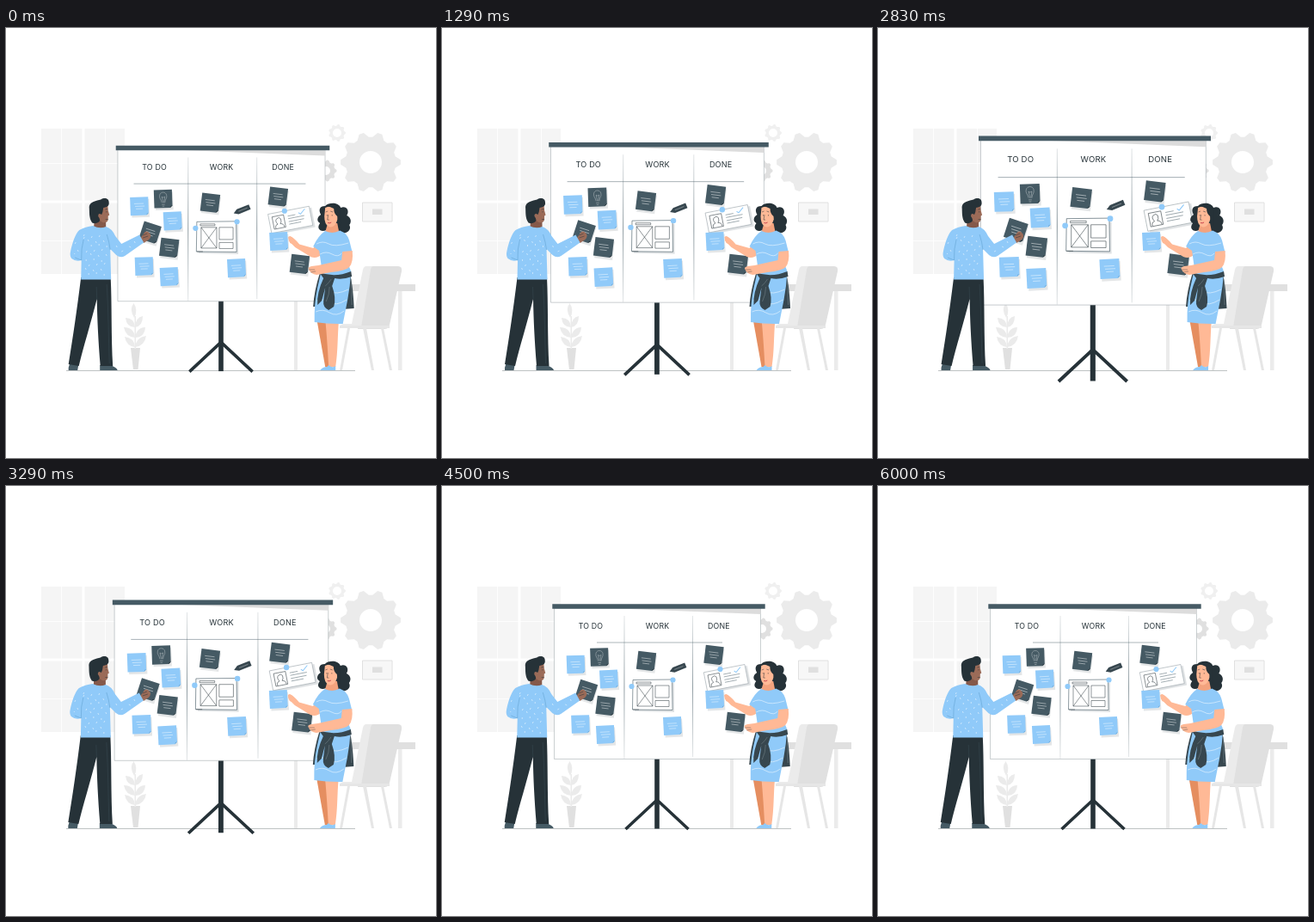
An HTML page that plays this animation: 500x500 px, repeating every 6040 ms.

```html
<!DOCTYPE html>
<html lang="en">
<head>
<meta charset="utf-8">
<title>Task board</title>
<style>
html, body { margin: 0; width: 100%; height: 100%; overflow: hidden; background: #fff; }
svg { display: block; width: 100%; height: 100%; }
text { font: 400 8.8px Inter, "Open Sans", sans-serif; letter-spacing: .15px; fill: #263238; }
.line { fill: none; stroke: #263238; stroke-width: .5; }
.white { fill: none; stroke: #fff; stroke-width: .5; }
.thin { fill: none; stroke: #455a64; stroke-width: .45; }
</style>
</head>
<body>
<svg viewBox="0 0 500 500">
  <linearGradient id="fade" gradientUnits="userSpaceOnUse" x1="0" y1="151" x2="0" y2="317">
    <stop stop-color="#455a64" stop-opacity=".25"/>
    <stop offset=".5" stop-color="#455a64"/>
    <stop offset="1" stop-color="#455a64" stop-opacity=".25"/>
  </linearGradient>
  <g id="room">
    <path fill="#f5f5f5" d="M41 117H138V286H41Z"/>
    <path stroke="#fff" stroke-width="3" d="M90 116V287M40 202H139"/>
    <path stroke="#fff" stroke-width=".8" d="M64.500 116V287M115.500 116V287M40 157.500H139M40 247.500H139"/>
    <path fill="#f7f7f7" stroke="#e0e0e0" d="M414.500 203H449V225H414.500Z"/>
    <path fill="#e0e0e0" d="M426 210.500H437.500V217H426ZM345 298H476V306H345Z"/>
    <path fill="#ebebeb" d="M335 306H339V398H335ZM456 306H460.500V398H456Z"/>
    <path fill="#e0e0e0" d="M419 277H456Q461 277 460 283L446 345Q445 350 440 350H409Z"/>
    <path fill="#ebebeb" d="M419 277H427Q425 277 424 281L413 348H388Q389 344 393 344H402L415 281Q416 277 419 277Z"/>
    <path fill="#e6e6e6" d="M388 346H446V349H388ZM397 349H400L391 398H388ZM415 349H419L428 398H425ZM436 349H439L449 398H446Z"/>
    <path fill="#e0e0e0" d="M145 372H156L153.500 397H148Z"/>
    <g fill="#ebebeb">
      <path d="M148.500 320Q143 327 149 337Q154 328 148.500 320ZM149.500 335H151V373H149.500Z"/>
      <path d="M150 348Q140 348 139 337Q149 337 150 348Q151 336 159 335Q159 347 150 348Z"/>
      <path d="M150 360Q139 359 137 348Q149 348 150 360Q152 348 162 348Q161 360 150 360Z"/>
      <path d="M150 371Q140 370 138 359Q149 360 150 371Q152 359 163 358Q161 370 150 371Z"/>
    </g>
  </g>

  <g id="board">
    <path stroke="#263238" stroke-width="3.600" fill="none" d="M250 365L213.500 399M250 365L286.500 399"/>
    <path fill="#263238" d="M247.200 316H252.800V398.500H247.200Z"/>
    <path fill="#fff" stroke="#a8b0b4" stroke-width=".6" d="M130.500 142H370.500V317.500H130.500Z"/>
    <path fill="#dcdcdc" d="M205 142.500H370.500V149Z"/>
    <path fill="#455a64" d="M128.300 137.300H375.700V142.700H128.300Z"/>
    <path fill="none" stroke="url(#fade)" stroke-width=".6" d="M212 151L211.900 317M291.500 151L291.600 315"/>
    <path class="thin" id="rule"/>
    <text x="158.700" y="165.500">TO DO</text>
    <text x="236.800" y="165.500">WORK</text>
    <text x="309" y="165.500">DONE</text>
    <g id="notes"></g>
    <path class="white" opacity=".6" d="M181.500 203.500C181 199.500 178 198.500 179 194.500C180 190.500 186 190.500 187 194.500C188 198.500 185 199.500 185 203.500M181.500 205.500H185M182 207.500H184.500M183 203.500L181.500 196.500L183 197.500L185 196.500L184 203.500"/>
    <g transform="rotate(-22 274 212)">
      <path fill="#37474f" d="M264 212L269 209H284V215H269Z"/>
      <path class="white" d="M270 212H281" opacity=".6"/>
    </g>
    <path fill="#dfe2e4" d="M224 228L270 229V263L224 262Z"/>
    <path fill="#fff" stroke="#455a64" stroke-width=".6" d="M222 225.500L267.500 225L268 260.500L221.500 260Z"/>
    <path class="line" d="M226 228H243V230H226ZM227 232H245V256H227ZL245 256M245 232L227 256M248 232H264V246H248ZM248 249.500V256.500H264V249.500ZM222 260H229"/>
    <g transform="rotate(-11 330 223)">
      <path fill="#dfe2e4" d="M308 214H357V237H308Z"/>
      <path fill="#fff" stroke="#8b979d" stroke-width=".5" d="M306 212H354.500V234.500H306Z"/>
      <path class="line" d="M310 216H323.500V230.500H310ZM312 230V228Q312 226 315 225.500Q312 221 315 219Q318 217 319.500 220Q320 224 318 225.500Q322 226 322 230"/>
      <path class="thin" d="M328 218.500H337M328 221.500H347M328 225H346M328 228H342"/>
      <path fill="none" stroke="#90caf9" d="M341 217L343 219L349 214"/>
    </g>
    <g fill="#90caf9">
      <circle cx="220.500" cy="233" r="3.100"/>
      <circle cx="268.500" cy="225.500" r="3.100"/>
      <circle cx="323.500" cy="213" r="3.100"/>
    </g>
  </g>

  <path class="line" d="M70 398.500H406" opacity=".6"/>

  <g id="man">
    <path fill="#455a64" d="M74 390L84 392L83 398H72.500Q72 395 74 390ZM109 392H121Q129 395 129.500 398H109Z"/>
    <path fill="#263238" d="M87 290H121.500C123 320 122 360 124 393H109.500C107 362 106 340 105.500 315C98 345 90 370 84.500 393L72.500 391C78 357 82 330 87 290Z"/>
    <path class="thin" d="M105.500 315L105 301M117 298C119 330 119 360 120 390" opacity=".7"/>
    <path fill="#85594a" d="M103 217L116 222V232Q109 236 102 231Z"/>
    <path fill="#9b6b58" d="M109 205H118L118.500 212L120 217.500L118.500 218.500V223Q117.500 227 112 226L106 222Z"/>
    <path fill="#9b6b58" d="M155 246L160 239Q162 235.500 165 237L167.500 239.500Q169 243 166 246L160 250Z"/>
    <path fill="#90caf9" d="M101 230Q109 234 116 231Q123 233 127 242L134 251L155 240.500L160 249.500L138 265Q133 268 128 264L121 257L122 292.500H87L87.500 270Q81 272 76 268Q73.500 265 75 259C77 250 80 240 85 235Q92 231 101 230Z"/>
    <path fill="none" stroke="#6ba9d8" stroke-width=".7" d="M90 246Q87 256 87.500 270M117 240Q120 249 121 258M80 267L87.500 270"/>
    <g id="flecks" class="white"></g>
    <path fill="#263238" d="M100 226.500C96 221 97 214 96.500 208C97 202 105 201 110 199.500C114 197 119.500 197.500 119.500 203Q120.500 208 113 209Q112.500 214 111 217Q107 214 107 219Q111 224 107 226Q104 228 100 226.500Z"/>
    <path class="line" d="M115 211L118 210.500M116.500 213V214.500M115.500 222.500H118.500M159 241L164 239M159 244L165 242"/>
  </g>

  <g id="woman">
    <path fill="#e58e60" d="M361 338H376L376 368L376 394H371Z"/>
    <path fill="#ffb996" d="M371 338H387C385 360 386 375 383 394H375C374 375 373 360 371 338Z"/>
    <path fill="#90caf9" d="M365 398Q368 394 373 394L375 392Q379 396 383 393V398Z"/>
    <path fill="#37474f" d="M365 284H399Q403 295 404.500 326L391 327L360 324L357 324Q358 306 365 284Z"/>
    <path fill="#263238" d="M371 207C364 207 363 212 366 217C361 220 361 225 365 227C360 233 366 238 372 235L389 238C397 240 402 234 399 229C403 224 399 219 396 218C400 212 395 206 389 209C386 202 375 203 371 207Z"/>
    <path fill="#f3a37e" d="M374 227H385L387 237Q380 242 371 237Z"/>
    <path fill="#ffb996" d="M371 209Q376 206 384 209Q388 218 384 226Q381 233 375 231Q370 228 370 219Z"/>
    <path fill="#263238" d="M373 207Q383 204 389 210L389 230Q385 225 385 219Q381 216 381 210Q377 208 373 207Z"/>
    <path class="line" d="M371.500 214L374 213M377 213L380 214M373 217V218.500M379 217V218.500M374.500 217L373.500 223H375.500"/>
    <path fill="none" stroke="#c9444d" d="M374 226.500Q376 227.500 378 226"/>
    <path fill="#ffb996" d="M366 247L357 256L341 251.500Q334 243 330 242Q326 243 329 248L336 255L354 266Q361 269 367 263Z"/>
    <path fill="#90caf9" d="M371 236Q380 240 388 235.500Q397 239 399 247L402.500 261L393 263L401 283Q400 300 397 316L391.500 344Q375 344.500 358.500 342Q358 320 362 302L367 280L364 259L357 254Q363 241 371 236Z"/>
    <path class="white" d="M361 251Q368 247 375 251T398 250M365 263Q372 259 379 263T390 262M364 305Q371 301 377 306T398 304M361 317Q369 314 376 319T396 316M360 330Q368 326 376 331T393 329"/>
    <path fill="#37474f" d="M364 284Q382 291 401 283L402 289Q391 293 382 291L379 300Q384 314 381 324L375 328Q368 325 369 317L371 302L367 317L362 322Q361 308 369 291Z"/>
    <path fill="none" stroke="#718087" stroke-width=".6" d="M371 300Q375 297 378 292M372 318Q376 310 376 301M401 292L402 322"/>
    <path fill="#ffb996" d="M391 260L402.500 259Q404 272 399 278Q395 282 378 284L361 287Q354 286 352 281Q350 278 355 277L363 276L390 270Z"/>
    <path class="line" d="M352 281L359 281M354 284L360 283" opacity=".7"/>
    <g id="held"></g>
  </g>
</svg>
<script>
const LOOP = 6040, DARK = '#455a64', BLUE = '#90caf9';
const el = id => document.getElementById(id);

function gear(x, y, r, hole, teeth, color) {
  let d = '';
  for (let i = 0; i < teeth * 4; i++) {
    const a = (i - .5) / (teeth * 4) * 2 * Math.PI;
    const q = i % 4 < 2 ? r : r * .84;
    d += `${i ? 'L' : 'M'}${x + q * Math.cos(a)} ${y + q * Math.sin(a)}`;
  }
  d += `ZM${x - hole} ${y}a${hole} ${hole} 0 1 0 ${2 * hole} 0a${hole} ${hole} 0 1 0 ${-2 * hole} 0Z`;
  return `<path fill="${color}" fill-rule="evenodd" d="${d}"/>`;
}

function note(x, y, angle, color, lined = true) {
  const fold = color === DARK ? '#263238' : '#6ba9d8';
  return `<g transform="translate(${x} ${y}) rotate(${angle})">
    <path fill="#e4e6e7" d="M-9 -8H11.500V13H-9Z"/>
    <path fill="${color}" d="M-10.500 -10.500H10.500V8L8 10.500H-10.500Z"/>
    <path fill="${fold}" d="M10.500 8L8 10.500L8.500 8.500Z"/>
    ${lined ? '<path class="white" d="M-6 -3H5M-5 0H6M-4 3H4" opacity=".85"/>' : ''}</g>`;
}

el('room').innerHTML += gear(424, 156, 35, 13, 10, '#ebebeb')
  + gear(385, 122, 10, 5, 9, '#f0f0f0') + gear(372, 166, 12.5, 5, 9, '#e0e0e0');

el('notes').innerHTML = [
  [155.5, 207.5, -2, BLUE], [194, 224.5, -3, BLUE], [161, 277, -2, BLUE],
  [190, 289, -3, BLUE], [268, 279, -3, BLUE],
  [183, 199, -2, DARK, false], [168, 238, 18, DARK], [190, 255.5, 7, DARK],
  [237.5, 203.5, 7, DARK], [316, 196.5, 7, DARK], [341, 274.5, 7, DARK]
].map(n => note(...n)).join('');
el('held').innerHTML = note(317, 248, -3, BLUE)
  + '<path fill="#ffb996" d="M328 243Q331 241 335 246L338 253L330 250Z"/>';

let flecks = '';
for (let i = 0; i < 28; i++) {
  const x = 91 + i * 17 % 27, y = 240 + i * 11 % 49;
  flecks += `M${x} ${y}l${i % 3 - 1} 2`;
}
flecks += 'M81 249l-1 2M83 258l1 2M79 262l1 1M128 253l1 2M134 260l2 -1M143 254l2 1M149 248l1 2';
el('flecks').innerHTML = `<path d="${flecks}"/>`;

// CSS "ease" curve: cubic-bezier(.25, .1, .25, 1)
function ease(x) {
  const bez = (a, b, u) => 3 * a * u * (1 - u) ** 2 + 3 * b * u * u * (1 - u) + u ** 3;
  let lo = 0, hi = 1;
  for (let i = 0; i < 20; i++) {
    const mid = (lo + hi) / 2;
    if (bez(.25, .25, mid) < x) lo = mid; else hi = mid;
  }
  return bez(.1, 1, lo);
}

// Board zoom keys: [time, scale]
const zoom = [[-40, 1], [600, 1.097], [2400, 1], [2430, 1], [3000, 1.097], [3800, 1], [LOOP, 1]];
function boardScale(t) {
  const i = zoom.findIndex(k => t < k[0]);
  const [t0, a] = zoom[i - 1], [t1, b] = zoom[i];
  return a + (b - a) * ease((t - t0) / (t1 - t0));
}

function draw(now) {
  const t = now % LOOP, s = boardScale(t);
  el('board').setAttribute('transform', `translate(252 267.5) scale(${s}) translate(-252 -267.5)`);
  el('rule').setAttribute('d', s > 1.001 ? 'M149 181.500H348' : 'M180 182H326');
  const sway = .2 + 2.8 * Math.exp(-(((t - 2330) / 400) ** 2)) - .4 * Math.sin(t / LOOP * 8 * Math.PI);
  for (const id of ['man', 'woman']) el(id).setAttribute('transform', `translate(${sway} 0)`);
}

const start = performance.now();
function tick() {
  draw(performance.now() - start);
  requestAnimationFrame(tick);
}
tick();
</script>
</body>
</html>
```
